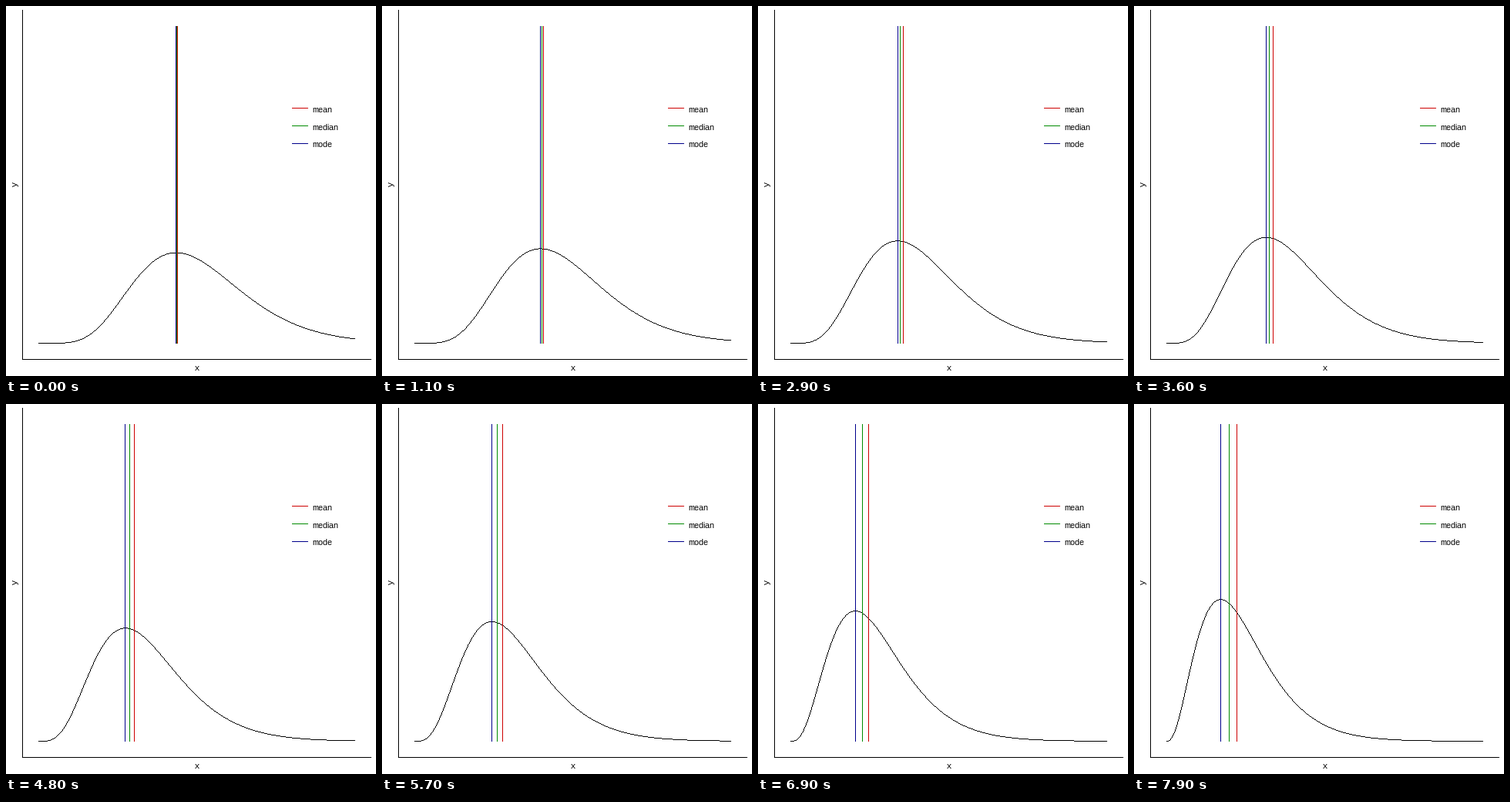
These frames come from a looping animation (480x480 px, 8 s). A matplotlib script:

```python
import math

import numpy as np
import matplotlib.pyplot as plt
from matplotlib.animation import FuncAnimation
from matplotlib.collections import LineCollection

SIZE, FRAMES, INTERVAL = 480, 80, 100
X0, X_UNIT = 41.93, 27.45     # pixel of x = 0, pixels per unit
BASE, Y_UNIT = 437.5, 760     # pixel of y = 0, pixels per unit of density
RED, GREEN, BLUE = "#cd0000", "#008b00", "#00008b"

plt.rcParams.update({
    "font.family": "Liberation Sans",
    "font.size": 11,
    "text.hinting": "native",
    "text.hinting_factor": 1,
    "path.snap": False,
    "lines.solid_capstyle": "butt",
    "lines.linewidth": 1,
})

fig = plt.figure(figsize=(SIZE / 72, SIZE / 72), dpi=72, facecolor="white")
ax = fig.add_axes([0, 0, 1, 1])
ax.set(xlim=(0, SIZE), ylim=(SIZE, 0))
ax.axis("off")


def label(x, y, text, **kw):
    ax.text(x, y, text, color="black", **kw)


# axes
ax.plot([21.5, 21.5], [5, 459], color="black")
ax.plot([21, 474], [458.5, 458.5], color="black")
label(248, 473, "x", ha="center", va="baseline")
label(12, 231.5, "y", ha="center", va="center", rotation=90)

# legend
for y, base, color, name in ((132.5, 138, RED, "mean"),
                             (155.5, 161, GREEN, "median"),
                             (178.5, 183, BLUE, "mode")):
    ax.plot([371, 392], [y, y], color=color)
    label(397.5, base, name, va="baseline")

curve = LineCollection([], colors="black", linewidths=1, capstyle="butt")
ax.add_collection(curve, autolim=False)
mean, median, mode = (ax.plot([], [], color=c)[0] for c in (RED, GREEN, BLUE))
cols = np.arange(42, 453)


def curve_y(px, k):
    x = np.maximum(px - X0, 0) / X_UNIT
    return BASE - Y_UNIT * x ** (k - 1) * np.exp(-x) / math.gamma(k)


def pixel_runs(k):
    """One crisp vertical run of whole pixels per column, one pixel thick."""
    mid = np.floor(curve_y(cols, k))
    left, right = curve_y(cols - 0.5, k), curve_y(cols + 0.5, k)
    top = np.minimum(mid, np.ceil(np.minimum(left, right) - 0.5))
    bottom = np.maximum(mid + 1, np.ceil(np.maximum(left, right) - 0.5))
    x = cols + 0.5
    return np.stack([np.column_stack([x, top]), np.column_stack([x, bottom])], axis=1)


def place(line, x):
    px = math.floor(x + 0.5) + 0.5
    line.set_data([px, px], [26, 438])


def draw(n):
    k = 7.5 - 0.05 * n
    curve.set_segments(pixel_runs(k))
    peak = X0 + X_UNIT * (k - 1)
    place(mode, peak)
    place(median, peak + 0.9 + 0.065 * n + 0.0008 * n * n)
    place(mean, peak + 1.65 + 0.165 * n + 0.00099 * n * n)
    return curve, mean, median, mode


anim = FuncAnimation(fig, draw, frames=FRAMES, interval=INTERVAL, repeat=True, repeat_delay=0)
plt.show()
```
